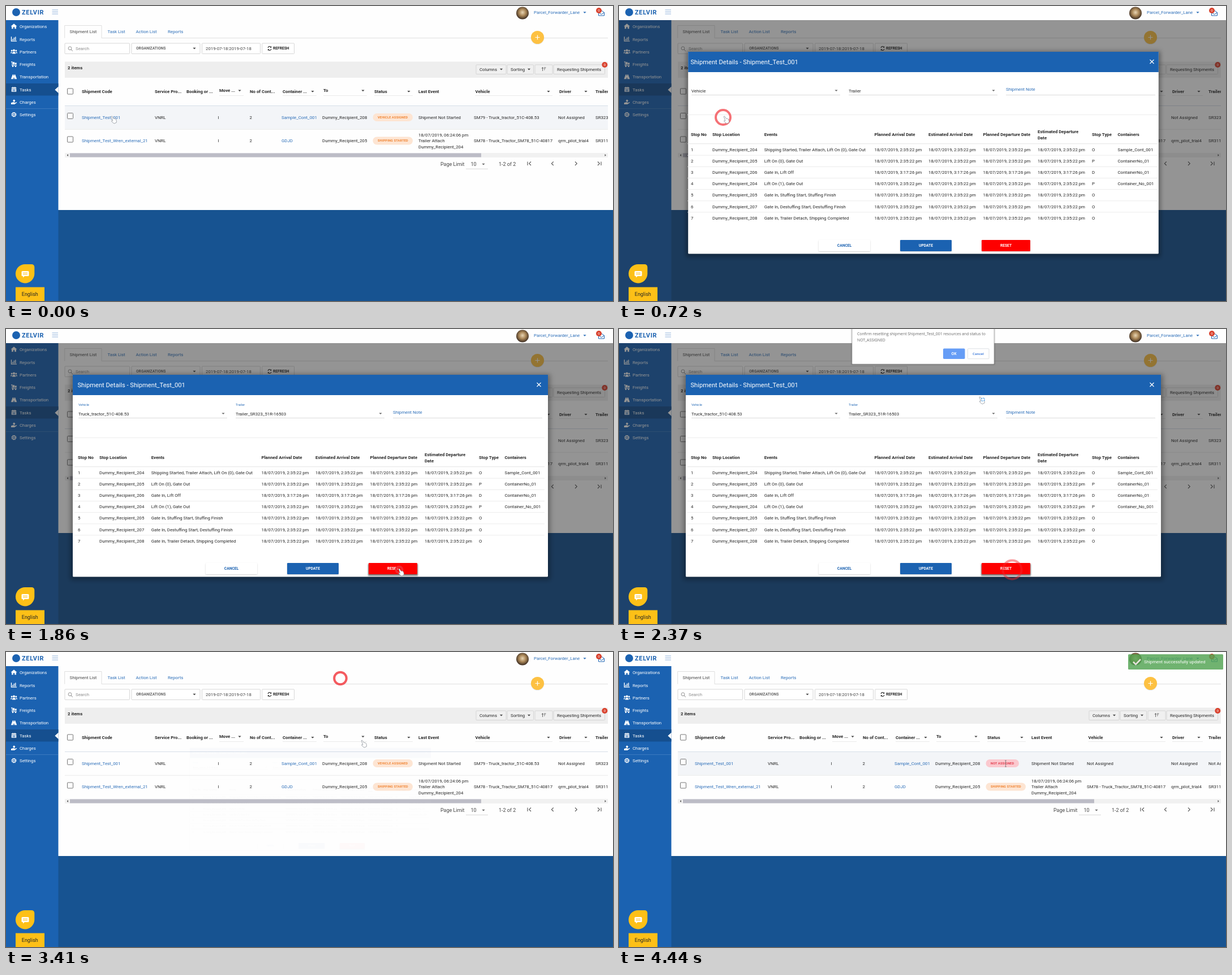
An HTML page for the animation above (4930 ms loop, 1073 by 522 pixels).

```html
<!DOCTYPE html>
<html lang="en">
<head>
<meta charset="utf-8">
<title>Shipment reset</title>
<style>
html, body { margin: 0; width: 100%; height: 100%; overflow: hidden; background: #fefefe; }
svg { display: block; width: 100%; height: 100%; }
text { font-family: Roboto, Arial, sans-serif; white-space: pre; }
.os { font-family: "Open Sans", "Noto Sans", sans-serif; }
</style>
</head>
<body>
<svg id="stage" viewBox="0 0 1073 522" preserveAspectRatio="none"></svg>
<script>
const LOOP = 4930, BLUE = '#1b62b1', LINK = '#2a6db8', INK = '#262626', YELLOW = '#fdc017';

// Type sizes: the page is 1920 px wide, shown at 1073
const px = n => +(n * 1073 / 1920).toFixed(3);
const BODY = px(14), SMALL = px(12), LARGE = px(16);

// Markup helpers; text is placed by its vertical centre
const text = (x, y, s, o = {}) => {
  const size = o.size || BODY;
  return `<text x="${x}" y="${y + size * .355}" font-size="${size}" fill="${o.fill || INK}"` +
    ` font-weight="${o.bold ? 700 : 400}" text-anchor="${o.mid ? 'middle' : 'start'}"` +
    ` letter-spacing="${o.gap || 0}" class="${o.cls || ''}">${s}</text>`;
};
const bold = (x, y, s, o) => text(x, y, s, { bold: true, ...o });
const box = (x, y, x2, y2, fill, extra = '') =>
  `<rect x="${x}" y="${y}" width="${x2 - x}" height="${y2 - y}" fill="${fill}" ${extra}/>`;
const framed = (x, y, x2, y2, fill = '#fff', stroke = '#cdcdcd') =>
  box(x, y, x2, y2, fill, `stroke="${stroke}" stroke-width=".8" rx="1"`);
const path = (d, stroke, width = 1, fill = 'none') =>
  `<path d="${d}" fill="${fill}" stroke="${stroke}" stroke-width="${width}"/>`;
const solid = (d, fill) => `<path d="${d}" fill="${fill}"/>`;
const hline = (x, x2, y, color = '#e3e3e3', width = .8) => path(`M${x} ${y}H${x2}`, color, width);
const dot = (x, y, r, fill) => `<circle cx="${x}" cy="${y}" r="${r}" fill="${fill}"/>`;
const caret = (x, y, fill = '#444') => solid(`M${x - 2.6} ${y - 1.3}h5.2l-2.6 2.7z`, fill);
const group = (id, body, extra = '') => `<g id="${id}" ${extra}>${body}</g>`;
const badge = (x, y) => dot(x, y, 5, '#d9432f') + text(x, y, '0', { size: 6.2, fill: '#fff', mid: true });
const client = n => 'Dummy_Recipient_20' + n;

function topBar() {
  return box(0, 0, 1073, 25, '#fefefe') +
    dot(18, 11, 7, BLUE) +
    bold(28, 10.8, 'ZELVIR', { size: 11, fill: BLUE, gap: .7 }) +
    [7, 10.5, 14].map(y => hline(81.5, 92, y, '#7fa6d6', .9)).join('') +
    dot(913, 12.5, 11, 'url(#photo)') +
    text(933, 11.5, 'Parcel_Forwarder_Lane', { fill: LINK }) + caret(1023, 11.5, LINK) +
    path('M1047.5 11.5l5-3.5 5 3.5v5.5h-10zl5 3.3 5-3.3', BLUE, 1) + badge(1048, 8);
}

function navBar() {
  const items = ['Organizations', 'Reports', 'Partners', 'Freights', 'Transportation', 'Tasks', 'Charges', 'Settings'];
  const icons = [
    solid('M-5.5 0L0-4.8 5.5 0H4v4.3H1.2V1.2h-2.4v3.1H-4V0z', '#fff'),
    path('M-4.5-4V3.8H5M-2 2.5V0M.4 2.5V-2.5M2.8 2.5V-3.8', '#fff', 1.4),
    dot(0, -2, 2, '#fff') + dot(-3.8, -1.5, 1.5, '#fff') + dot(3.8, -1.5, 1.5, '#fff') +
      solid('M-3 4q0-3.5 3-3.5T3 4zM-6 3q0-2.4 2.4-2.4L-3.6 3zM6 3Q6 .6 3.6.6V3z', '#fff'),
    path('M-5-4h2V2.6h8', '#fff', 1.2) + box(-1.8, -3.8, 1, 1, '#fff') + box(1.6, -2.5, 4.6, 1, '#fff') +
      dot(-2, 3.8, 1.2, '#fff') + dot(3, 3.8, 1.2, '#fff'),
    solid('M-2.2-4h1.6v2h1.2v-2h1.6L5.2 4H.7V1.5H-.7V4h-4.5z', '#fff'),
    solid('M-4.2-3.5h2v-1.2h1v1.2h2.4v-1.2h1v1.2h2v1.8h-8.4zM-4.2-1h8.4v5.3h-8.4z', '#fff') +
      path('M-3 .9h6M-3 2.7h6M-1 0v3.5M1 0v3.5', BLUE, .6),
    solid('M-5 1.5l3-1h3v1.3l3.8-1.6.4 1-4.2 2.9h-6zM0-4.5l2.5 2.2L.5.2-2-2z', '#fff'),
    `<circle r="3.6" fill="none" stroke="#fff" stroke-width="1.6" stroke-dasharray="1.9 .9"/>` +
      `<circle r="2.8" fill="none" stroke="#fff"/>` + dot(0, 0, 1.2, '#fff')
  ];
  return box(0, 25, 92.5, 522, BLUE) + box(0, 137, 92.5, 158.5, '#154f8f') +
    solid('M92.6 142.5v11.6l-6.2-5.8z', '#fefefe') + hline(0, 92, 181.6, '#4c86c6', .7) +
    items.map((s, i) => {
      const y = 36.5 + i * 22.3;
      return `<g transform="translate(14 ${y - .5})">${icons[i]}</g>` + text(24, y, s, { fill: '#fff' });
    }).join('');
}

function listTable() {
  const heads = [[134, 'Shipment Code'], [263, 'Service Pro...'], [319, 'Booking or ...'], [377, 'Move ...', 413],
    [431, 'No of Cont...'], [489, 'Container ...', 542], [561, 'To', 631], [651, 'Status', 712],
    [729, 'Last Event'], [829.5, 'Vehicle', 959], [978, 'Driver', 1025], [1042, 'Trailer']];
  const check = y => `<rect x="108.5" y="${y}" width="10" height="10" fill="#fff" stroke="#757575" rx="1"/>`;
  const pill = (x2, y, s, bg, fg) => box(648.5, y - 7, x2, y + 7, bg, 'rx="7"') +
    bold(657, y, s, { size: 5.6, fill: fg, gap: .18 });
  const row = (y, code, cont, to, driver) => check(y - 7.5) + text(134, y, code, { fill: LINK }) +
    text(263, y, 'VNRL') + text(374.5, y, 'I') + text(430.5, y, '2') + text(487, y, cont, { fill: LINK }) +
    text(559, y, client(to)) + text(976, y, driver);
  const shipping = ['#fde5d3', '#f0822f'];
  return heads.map(([x, s, arrow]) => {
    const y = arrow && arrow < 640 && s !== 'Container ...' ? 149.5 : 151;
    return bold(x, y, s) + (arrow ? caret(arrow, y + .3) + hline(x, arrow + 7, 158.5, '#e2e2e2', .7) : '');
  }).join('') + check(146) +
    group('hover', box(104, 177, 1064, 218, '#f3f5f8')) +
    hline(104, 1064, 176.5, '#ccd6e2') + hline(104, 1064, 218.3, '#e6e6e6') +
    row(197, 'Shipment_Test_001', 'Sample_Cont_001', 8, 'Not Assigned') + text(729, 197, 'Shipment Not Started') +
    group('assigned', pill(719, 197, 'VEHICLE ASSIGNED', ...shipping) +
      text(827, 197, 'SM79 - Truck_tractor_51C-408.53') + text(1042, 197, 'SR323_51R')) +
    group('cleared', pill(707, 197, 'NOT ASSIGNED', '#fbc8ce', '#e23b4c') +
      text(827, 197, 'Not Assigned') + text(1042, 197, 'Not Assigned')) +
    row(238.5, 'Shipment_Test_Wren_external_21', 'GDJD', 5, 'qrm_pilot_trial4') +
    pill(719, 238.5, 'SHIPPING STARTED', ...shipping) +
    text(729, 228, '18/07/2019, 06:24:06 pm') + text(729, 238.7, 'Trailer Attach') + text(729, 249.4, client(4)) +
    text(827, 238.5, 'SM78 - Truck_Tractor_SM78_51C-40817') + text(1042, 238.5, 'SR311_51R');
}

function listPage() {
  const tool = (x, x2) => framed(x, 104, x2, 120.5, '#f0f0f0', '#cfcfcf');
  return box(92, 25, 1073, 361, '#fefefe') + box(92, 361, 1073, 522, '#175391') +
    path('M169 56.7V34.5H103.7V56.7M169 56.7H1064', '#dcdcdc', .9) +
    text(112.5, 45.5, 'Shipment List', { fill: '#444' }) +
    [[179.5, 'Task List'], [229.5, 'Action List'], [286, 'Reports']].map(([x, s]) => text(x, 45.5, s, { fill: LINK })).join('') +
    dot(939.5, 56.3, 11.8, '#00000018') + dot(939.5, 55.5, 11.5, '#fdc142') + path('M935.5 55.5h8M939.5 51.5v8', '#fff', 1.2) +
    framed(104, 66, 218.5, 84.5) +
    `<circle cx="113" cy="74.8" r="2.9" fill="none" stroke="#888" stroke-width=".9"/>` + path('M115 77l2.8 2.8', '#888') +
    text(123, 75.4, 'Search', { fill: '#8a8a8a' }) +
    framed(222, 66, 343, 84.5) + bold(230, 75, 'ORGANIZATIONS', { size: SMALL, fill: '#666' }) + caret(333, 75) +
    framed(346.5, 66, 449.5, 84.5) + text(353, 75.3, '2019-07-18:2019-07-18', { fill: '#444' }) +
    framed(452.7, 66, 509.5, 84.5) + bold(472, 75, 'REFRESH', { size: SMALL }) +
    path('M463 74a3 3 0 0 1 5.4-1.2M469 76a3 3 0 0 1-5.4 1.2', '#222', 1.1) +
    solid('M469.2 71v2.8h-2.8zM462.8 79v-2.8h2.8z', '#222') +
    box(104, 98.5, 1064, 127, '#eeeeee') + bold(109, 109.3, '2 items') +
    tool(831, 884) + text(837, 112, 'Columns') + caret(875.5, 112) +
    tool(886, 932.5) + text(892, 112, 'Sorting') + caret(924.5, 112) +
    tool(935, 966) + path('M948.5 115v-6M947 110.5l1.5-2 1.5 2M951 109h3.4M951 111h2.4M951 113h1.2', '#444', .8) +
    tool(968, 1058.5) + text(974, 112, 'Requesting Shipments') + badge(1058.3, 104) +
    `<g clip-path="url(#tableClip)">${listTable()}</g>` +
    box(104, 260, 1064, 268, '#f1f1f1') + box(113, 260.5, 840, 267.5, '#bcbcc6') +
    solid('M110 262l-2.4 2 2.4 2zM1058.5 262l2.4 2-2.4 2z', '#555') +
    text(768, 279.5, 'Page Limit', { size: LARGE, fill: '#444' }) + text(821.5, 280, '10', { size: LARGE, fill: '#444' }) +
    caret(844, 280, '#666') + hline(813, 852, 288.3, '#d0d0d0') + text(871, 279.5, '1-2 of 2', { size: LARGE, fill: '#444' }) +
    path('M922 275.5v6.5M928 275.5l-3.3 3.2 3.3 3.3M967.7 275.5l-3.3 3.2 3.3 3.3M1006 275.5l3.3 3.2-3.3 3.3M1046 275.5l3.3 3.2-3.3 3.3M1052 275.5v6.5', '#555', 1.1);
}

function detailsModal() {
  const cols = [127, 165, 256.7, 451.5, 547, 643.5, 740, 836, 881.5];
  const heads = ['Stop No', 'Stop Location', 'Events', 'Planned Arrival Date', 'Estimated Arrival Date',
    'Planned Departure Date', '', 'Stop Type', 'Containers'];
  const stops = [
    [4, 'Shipping Started, Trailer Attach, Lift On (0), Gate Out', 'O', 'Sample_Cont_001'],
    [5, 'Lift On (0), Gate Out', 'P', 'ContainerNo_01'],
    [6, 'Gate In, Lift Off', 'D', 'ContainerNo_01'],
    [4, 'Lift On (1), Gate Out', 'P', 'Container_No_001'],
    [5, 'Gate In, Stuffing Start, Stuffing Finish', 'O', ''],
    [7, 'Gate In, Destuffing Start, Destuffing Finish', 'O', ''],
    [8, 'Gate In, Trailer Detach, Shipping Completed', 'O', '']
  ];
  const body = stops.map(([who, events, type, cont], i) => {
    const y = 254 + i * 20.15, date = `18/07/2019, ${i === 2 ? '3:17:26' : '2:35:22'} pm`;
    return [i + 1, client(who), events, date, date, date, date, type, cont].map((s, c) => text(cols[c], y, s)).join('') +
      (i < 6 ? hline(121, 952, y + 10.2, '#e8e8e8') : '');
  }).join('');
  const button = (x, x2, s, bg, fg) => box(x, 415, x2, 435, '#00000030', 'rx="1.5" filter="url(#soft)"') +
    box(x, 414, x2, 434, bg, 'rx="1.2"') + bold((x + x2) / 2, 424, s, { size: SMALL, fill: fg, mid: true });
  const field = (x, x2) => hline(x, x2, 157.5, '#d2d2d2') + (x < 600 ? caret(x2 - 7, 149.7, '#666') : '');
  return group('frame', box(114, 80, 962, 444, '#00000050', 'filter="url(#shade)"') +
      box(118, 81, 958, 438.5, '#fff', 'rx="1.5"') + box(118, 81, 958, 117, BLUE)) +
    text(126.5, 99, 'Shipment Details - Shipment_Test_001', { size: px(20), fill: '#fff' }) +
    path('M938.5 95l7 7M945.5 95l-7 7', '#fff', 1.2) +
    field(128, 391) + field(406, 669) + field(684, 948) + text(684, 147.5, 'Shipment Note', { fill: LINK }) +
    group('empty', text(128, 150, 'Vehicle') + text(406, 150, 'Trailer')) +
    group('filled', text(128, 133.7, 'Vehicle', { size: px(10.5), fill: LINK }) +
      text(406, 133.7, 'Trailer', { size: px(10.5), fill: LINK }) +
      text(128, 150, 'Truck_tractor_51C-408.53') + text(406, 150, 'Trailer_SR323_51R-16503')) +
    hline(121, 952, 192.5, '#e8e8e8') + heads.map((s, i) => bold(cols[i], 227.5, s)).join('') +
    bold(740, 222.3, 'Estimated Departure') + bold(740, 233, 'Date') + hline(121, 952, 243.7, '#dedede') + body +
    button(353, 444, 'CANCEL', '#fff', BLUE) + button(497, 588, 'UPDATE', BLUE, '#fff') +
    group('raised', box(640, 416, 728, 437, '#00000075', 'filter="url(#soft)"')) +
    button(641, 727, 'RESET', '#fe0000', '#fff');
}

function confirmBox() {
  const line = { size: 6.84, fill: '#666', cls: 'os' };
  return box(411, -18, 664, 63, '#00000050', 'filter="url(#soft)"') + framed(412, -20, 663, 62, '#fff', '#b5b5b5') +
    text(421, 9, 'Confirm resetting shipment Shipment_Test_001 resources and status to', line) +
    text(421, 20, 'NOT_ASSIGNED', line) +
    box(573, 34.5, 611.5, 53, '#669df6', 'rx="1.8"') + framed(616.5, 34.8, 654, 52.7, '#fff', '#d5d8dc') +
    bold(592, 43.8, 'OK', { size: 6.3, fill: '#fff', mid: true, cls: 'os' }) +
    bold(635, 43.8, 'Cancel', { size: 6, fill: '#4a83dc', mid: true, cls: 'os' });
}

const stage = document.getElementById('stage');
stage.innerHTML = `<defs>
  <clipPath id="tableClip"><rect x="104" y="128" width="960" height="132"/></clipPath>
  <filter id="soft" x="-20%" y="-40%" width="140%" height="180%"><feGaussianBlur stdDeviation="1.2"/></filter>
  <filter id="shade"><feGaussianBlur stdDeviation="4"/></filter>
  <radialGradient id="photo" cx=".5" cy=".45" r=".55">
    <stop offset="0" stop-color="#e8d5b4"/><stop offset=".5" stop-color="#a98657"/><stop offset="1" stop-color="#3b2c22"/>
  </radialGradient></defs>` +
  listPage() + navBar() + topBar() +
  group('backdrop', box(0, 25, 1073, 522, '#212121')) +
  `<path d="M33.7 457H45Q50.3 457 50.3 462.5V474A16.7 16.7 0 1 1 33.7 457z" fill="${YELLOW}"/>` +
  box(27.5, 469, 40.5, 478, '#fff', 'rx="1.5"') + solid('M30 477h4l-4 3.4z', '#fff') +
  path('M30 472.2h8M30 474.8h8', YELLOW, 1) +
  box(17, 497.5, 68, 522, YELLOW) + text(42.3, 510.3, 'English', { size: LARGE, mid: true }) +
  group('modal', detailsModal()) + group('confirm', confirmBox()) +
  group('toast', box(900, 4, 1068, 31, '#51a351', 'rx="1.5"') + path('M909 17.5l4.5 4.5 8.5-9', '#fff', 2.6) +
    text(928, 17.7, 'Shipment successfully updated', { fill: '#fff' })) +
  '<circle id="ring" fill="none" stroke="#f0282f"/>' +
  group('cursor',
    group('hand', path('M0 .6Q1.2-.6 2.2.8L4.3 4.4Q6.6 3.6 8.2 5.3 9.8 8 9.2 11.2L5.4 13Q2.2 11.8.2 8.2 1 7 2.8 8.2z', '#8d939b', .8, '#fff')) +
    group('busy', `<circle cx="6.5" cy="5" r="2.8" fill="#fff" stroke="#5aa5e8" stroke-width="1.4" stroke-dasharray="3 1.4"/>`) +
    group('beam', path('M-1.5-5.5H0H1.5M0-5.5V5.5M-1.5 5.5H1.5', '#777', .8)));

const el = {};
for (const node of stage.querySelectorAll('[id]')) el[node.id] = node;

const ramp = (t, a, b) => Math.min(1, Math.max(0, (t - a) / (b - a)));
const fade = (node, v) => {
  node.setAttribute('opacity', v);
  node.setAttribute('display', v > 0 ? 'inline' : 'none');
};
const move = (node, x, y) => node.setAttribute('transform', `translate(${x} ${y})`);
const zoom = (node, sx, sy) =>
  node.setAttribute('transform', `translate(538 260) scale(${sx} ${sy}) translate(-538 -260)`);

const route = [[0, 186, 195], [900, 185, 195], [1240, 464, 271], [1490, 694, 424], [1900, 694, 424],
  [2370, 637, 120], [2760, 591, 44], [3160, 591, 44], [3410, 628, 156], [3850, 683.5, 197.5], [LOOP, 683.5, 197.5]];
const clicks = [[70, 184, 197], [1550, 695, 426], [2860, 591, 46.5]];

function pointer(t) {
  const i = route.findIndex((k, n) => n && t <= k[0]);
  const [a, x, y] = route[i - 1], [b, x2, y2] = route[i], p = ramp(t, a, b);
  return [x + (x2 - x) * p, y + (y2 - y) * p];
}

function render(t) {
  fade(el.backdrop, .48 * (ramp(t, 330, 470) - ramp(t, 2940, 3120)));

  const open = ramp(t, 350, 560) - ramp(t, 3140, 3415), scale = .5 + .5 * open;
  fade(el.modal, Math.min(1, open * 1.08));
  zoom(el.modal, scale, scale);

  // The dialog widens slightly once its fields are loaded
  const loaded = t >= 800;
  zoom(el.frame, loaded ? 1 : .99, 1);
  fade(el.empty, loaded ? 0 : 1);
  fade(el.filled, loaded ? 1 : 0);
  fade(el.raised, t > 1620 ? 1 : 0);

  const enter = ramp(t, 1960, 2080), leave = ramp(t, 3090, 3220);
  fade(el.confirm, enter * (1 - leave ** 2));
  move(el.confirm, 0, -16 * (1 - enter) - 13 * leave);

  const reset = t >= 4100;
  fade(el.assigned, reset ? 0 : 1);
  fade(el.cleared, reset ? 1 : 0);
  fade(el.hover, t < 450 || t > 3600 ? 1 : 0);
  fade(el.toast, .82 * ramp(t, 3850, 4400));

  const hit = clicks.find(([start]) => t > start + 60 && t < start + 1190);
  if (hit) {
    const p = (t - hit[0]) / 1180, radius = 26 * p ** .93, width = Math.min(4, radius);
    el.ring.setAttribute('cx', hit[1]);
    el.ring.setAttribute('cy', hit[2]);
    el.ring.setAttribute('r', radius - width / 2);
    el.ring.setAttribute('stroke-width', width);
    fade(el.ring, Math.min(1, Math.max(.08, 1.35 - 1.25 * p)));
  } else fade(el.ring, 0);

  move(el.cursor, ...pointer(t));
  fade(el.hand, t < 3850 ? 1 : 0);
  fade(el.beam, t < 3850 ? 0 : 1);
  fade(el.busy, t > 2050 && t < 2500 ? 1 : 0);
}

const began = performance.now();
function tick() {
  render((performance.now() - began) % LOOP);
  requestAnimationFrame(tick);
}
tick();
</script>
</body>
</html>
```
